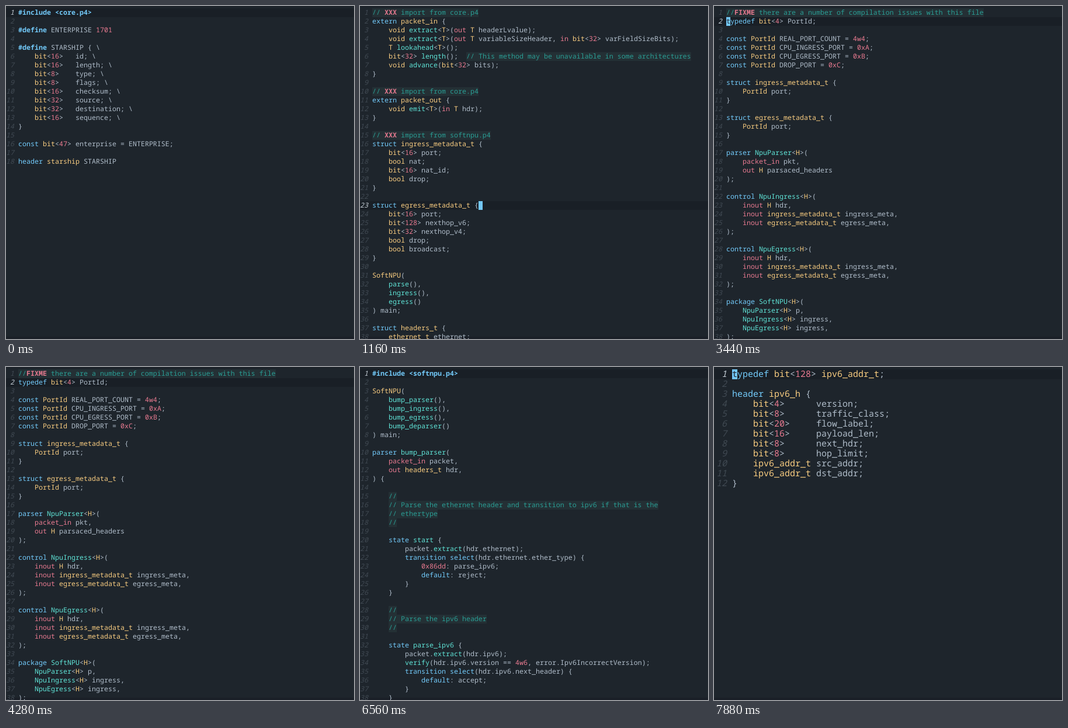
These frames come from a looping animation (596 px wide and 570 px high, 8 s). An HTML page:

```html
<!DOCTYPE html>
<html>
<head>
<meta charset="utf-8">
<style>
html, body { margin: 0; width: 100%; height: 100%; overflow: hidden; background: #1e252c; }
svg { display: block; }
text { font-family: "Fira Code", "Noto Sans Mono", "DejaVu Sans Mono", monospace; fill: #b0bdca;
  white-space: pre; text-rendering: geometricPrecision; font-variant-ligatures: none; }
.num { fill: #414a53; font-style: italic; text-anchor: end; }
.num.on { fill: #c3ccd4; }
.com { fill: #2a9d94; }
.dir { fill: #73cbfb; font-weight: bold; }
.key { fill: #73cbfb; }
.fn { fill: #5fe3d6; }
.arg { fill: #e87a90; }
.type { fill: #f8cc80; }
.todo { fill: #e87a90; font-weight: bold; }
.dark { fill: #1e252c; }
</style>
</head>
<body>
<svg id="stage" width="596" height="570" viewBox="0 0 596 570"></svg>
<script>
const LOOP = 8000, TOP = 4;

const small = { left: 0, cw: 7, lh: 15, base: 11, size: 7 / 0.6 };
const large = { left: 4, cw: 9, lh: 17, base: 13, size: 15 };

// row/col place the cursor; it is visible from the scene's start until blink
const scenes = [
  { start: 0, blink: 0, row: 0, col: 0, grid: small, code: String.raw`#include <core.p4>

#define ENTERPRISE 1701

#define STARSHIP { \
    bit<16>   id; \
    bit<16>   length; \
    bit<8>    type; \
    bit<8>    flags; \
    bit<16>   checksum; \
    bit<32>   source; \
    bit<32>   destination; \
    bit<16>   sequence; \
}

const bit<47> enterprise = ENTERPRISE;

header starship STARSHIP` },
  { start: 1040, blink: 2040, row: 22, col: 26, grid: small, code: `// XXX import from core.p4
extern packet_in {
    void extract<T>(out T headerLvalue);
    void extract<T>(out T variableSizeHeader, in bit<32> varFieldSizeBits);
    T lookahead<T>();
    bit<32> length();  // This method may be unavailable in some architectures
    void advance(bit<32> bits);
}

// XXX import from core.p4
extern packet_out {
    void emit<T>(in T hdr);
}

// XXX import from softnpu.p4
struct ingress_metadata_t {
    bit<16> port;
    bool nat;
    bit<16> nat_id;
    bool drop;
}

struct egress_metadata_t {
    bit<16> port;
    bit<128> nexthop_v6;
    bit<32> nexthop_v4;
    bool drop;
    bool broadcast;
}

SoftNPU(
    parse(),
    ingress(),
    egress()
) main;

struct headers_t {
    ethernet_t ethernet;` },
  { start: 3440, blink: 4280, row: 1, col: 0, grid: small, code: `//FIXME there are a number of compilation issues with this file
typedef bit<4> PortId;

const PortId REAL_PORT_COUNT = 4w4;
const PortId CPU_INGRESS_PORT = 0xA;
const PortId CPU_EGRESS_PORT = 0xB;
const PortId DROP_PORT = 0xC;

struct ingress_metadata_t {
    PortId port;
}

struct egress_metadata_t {
    PortId port;
}

parser NpuParser<H>(
    packet_in pkt,
    out H parsaced_headers
);

control NpuIngress<H>(
    inout H hdr,
    inout ingress_metadata_t ingress_meta,
    inout egress_metadata_t egress_meta,
);

control NpuEgress<H>(
    inout H hdr,
    inout ingress_metadata_t ingress_meta,
    inout egress_metadata_t egress_meta,
);

package SoftNPU<H>(
    NpuParser<H> p,
    NpuIngress<H> ingress,
    NpuEgress<H> ingress,
);` },
  { start: 5520, blink: 6560, row: 0, col: 0, grid: small, code: `#include <softnpu.p4>

SoftNPU(
    bump_parser(),
    bump_ingress(),
    bump_egress(),
    bump_deparser()
) main;

parser bump_parser(
    packet_in packet,
    out headers_t hdr,
) {

    //
    // Parse the ethernet header and transition to ipv6 if that is the
    // ethertype
    //

    state start {
        packet.extract(hdr.ethernet);
        transition select(hdr.ethernet.ether_type) {
            0x86dd: parse_ipv6;
            default: reject;
        }
    }

    //
    // Parse the ipv6 header
    //

    state parse_ipv6 {
        packet.extract(hdr.ipv6);
        verify(hdr.ipv6.version == 4w6, error.Ipv6IncorrectVersion);
        transition select(hdr.ipv6.next_header) {
            default: accept;
        }
    }` },
  { start: 7760, blink: LOOP, row: 0, col: 0, grid: large, code: `typedef bit<128> ipv6_addr_t;

header ipv6_h {
    bit<4>      version;
    bit<8>      traffic_class;
    bit<20>     flow_label;
    bit<16>     payload_len;
    bit<8>      next_hdr;
    bit<8>      hop_limit;
    ipv6_addr_t src_addr;
    ipv6_addr_t dst_addr;
}` }
];

const rules = {
  com: /\/\/.*/,
  dir: /^#(?:include.*|define)/,
  key: /\b(?:const|header|extern|struct|typedef|parser|control|package|state|transition|select|default)\b/,
  arg: /(?<=^ +)packet_in\b|\b(?:in|out|inout)\b|\b\d\w*/,
  fn: /(?<=\b(?:state|parser|control|package) )\w+|\bNpu\w+|\b(?!SoftNPU)\w+(?=(?:<T>)?\()/,
  type: /\b(?:bit|bool|void|T|H|SoftNPU|packet_(?:in|out)|\w+_t|PortId(?!;))\b|(?<=\bheader )\w+/
};
const lexer = new RegExp(
  Object.entries(rules).map(([name, re]) => `(?<${name}>${re.source})`).join("|"), "g");

const escape = s => s.replace(/&/g, "&amp;").replace(/</g, "&lt;");
const rect = (x, y, w, h, fill) =>
  `<rect x="${x}" y="${y}" width="${w}" height="${h}" fill="${fill}"/>`;

function tokenize(line) {
  const tokens = [];
  let end = 0;
  const push = (cls, text, col) => text && tokens.push({ cls, text, col });
  for (const m of line.matchAll(lexer)) {
    push("", line.slice(end, m.index), end);
    const cls = Object.keys(rules).find(name => m.groups[name] !== undefined);
    let col = m.index;
    for (const part of cls === "com" ? m[0].split(/(XXX|FIXME)/) : [m[0]]) {
      push(/^(XXX|FIXME)$/.test(part) ? "todo" : cls, part, col);
      col += part.length;
    }
    end = m.index + m[0].length;
  }
  push("", line.slice(end), end);
  return tokens;
}

function drawLine(line, row, { grid, row: current }) {
  const { left, cw, lh, base } = grid;
  const x0 = left + 3 * cw, y = TOP + row * lh;
  const comment = line.indexOf("//");
  const shade = comment < 0 ? "" :
    rect(x0 + comment * cw, y, (line.length - comment) * cw, lh, "#243035");
  const spans = tokenize(line).map(t =>
    `<tspan class="${t.cls}" x="${x0 + t.col * cw}">${escape(t.text)}</tspan>`).join("");
  return `${shade}<text class="num${row === current ? " on" : ""}" x="${left + 2 * cw}" y="${y + base}">${row + 1}</text>` +
    `<text y="${y + base}">${spans}</text>`;
}

function drawScene(scene) {
  const { grid, row, col } = scene;
  const lines = scene.code.split("\n");
  const x = grid.left + (3 + col) * grid.cw, y = TOP + row * grid.lh;
  return `<g class="scene" font-size="${grid.size}">` +
    rect(0, y, 596, grid.lh, "#191f26") +
    lines.map((line, i) => drawLine(line, i, scene)).join("") +
    `<g class="cursor">${rect(x, y, grid.cw, grid.lh, "#73c7f8")}` +
    `<text class="dark" x="${x}" y="${y + grid.base}">${lines[row][col] || ""}</text></g></g>`;
}

const stage = document.getElementById("stage");
stage.innerHTML = rect(0, 0, 596, 570, "#1e252c") + rect(0, 0, 596, 2, "#1b2128") +
  rect(0, 566, 596, 4, "#1a1f27") + scenes.map(drawScene).join("");
const groups = [...stage.querySelectorAll(".scene")];
const cursors = [...stage.querySelectorAll(".cursor")];
const show = (el, on) => el.setAttribute("display", on ? "inline" : "none");

function render(time) {
  const active = scenes.findLastIndex(s => s.start <= time);
  groups.forEach((g, i) => show(g, i === active));
  show(cursors[active], time < scenes[active].blink);
}

function tick() {
  render(performance.now() % LOOP);
  requestAnimationFrame(tick);
}
tick();
</script>
</body>
</html>
```
